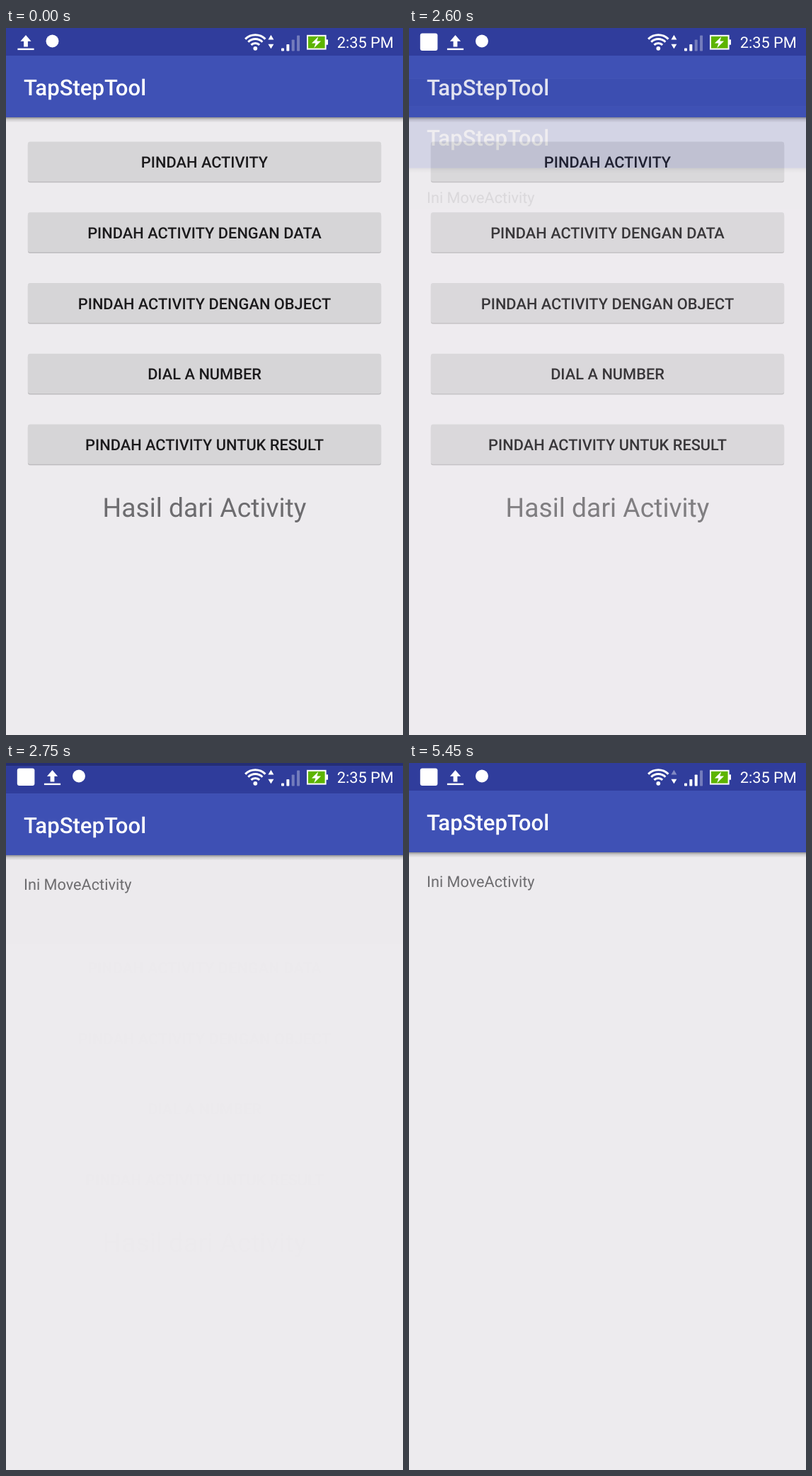
Recreate the animation shown at these times as an HTML page. Size 561x998 px, loop 5500 ms.

```html
<!DOCTYPE html>
<html lang="id">
<head>
<meta charset="utf-8">
<title>Pindah Activity</title>
<style>
  html, body { margin: 0; width: 100%; height: 100%; overflow: hidden; background: #ecebed; }
  svg { display: block; width: 100vw; height: 100vh; }
  text { font-family: Roboto, "Noto Sans", sans-serif; font-size: 21.8px; text-rendering: geometricPrecision; }
  .title { font-size: 31.1px; font-weight: 500; fill: #fff; }
  .label { font-weight: 500; text-anchor: middle; fill: #1b1a1c; }
  .body { font-size: 21.7px; fill: #6d6c6f; }
  .result { font-size: 37.3px; text-anchor: middle; }
</style>
</head>
<body>
<svg viewBox="0 0 561 998" preserveAspectRatio="none">
  <defs>
    <linearGradient id="shade" x1="0" y1="0" x2="0" y2="1">
      <stop offset="0" stop-color="#000" stop-opacity=".4"/>
      <stop offset=".4" stop-color="#000" stop-opacity=".14"/>
      <stop offset="1" stop-color="#000" stop-opacity="0"/>
    </linearGradient>
    <clipPath id="btnClip"><rect x="30.9" y="160.5" width="499.2" height="56.3" rx="3.2"/></clipPath>
    <g id="chrome">
      <rect width="561" height="998" fill="#edebee"/>
      <rect y="126" width="561" height="7.5" fill="url(#shade)"/>
      <rect y="39" width="561" height="87" fill="#3f51b5"/>
      <rect width="561" height="39" fill="#303d9c"/>
      <text class="title" x="25" y="94.7">TapStepTool</text>
    </g>
  </defs>

  <g id="menu">
    <use href="#chrome"/>
    <g id="buttons"></g>
    <text class="body result" x="280.5" y="690.3">Hasil dari Activity</text>
  </g>
  <rect id="dim" width="561" height="998"/>

  <g id="page">
    <use href="#chrome"/>
    <text class="body" x="25" y="174.9">Ini MoveActivity</text>
  </g>

  <g fill="#fff">
    <rect id="square" x="15.8" y="7.4" width="24.6" height="24.6" rx="3"/>
    <g id="notices">
      <path d="M28 10l7.6 8.8h-4.7v7.6h-5.8v-7.6h-4.7z"/>
      <rect x="16.4" y="28.7" width="23.2" height="2.4"/>
      <circle cx="65.5" cy="18.5" r="9"/>
    </g>
    <g id="wifi" fill="none" stroke="#fff" stroke-width="3"></g>
    <circle cx="352.3" cy="28.8" r="2.9"/>
    <path id="up" d="M374.4 9.8l4 6.6h-8z"/>
    <path d="M374.4 29.3l4-6.6h-8z"/>
    <g id="bars"></g>
    <rect x="426" y="10.8" width="25.6" height="18.8" fill="#5db400" stroke="#fff" stroke-width="2"/>
    <rect x="452" y="16.3" width="3" height="7.4"/>
    <path d="M441.3 12.3l-9.4 9.3h5.6l-2.3 6.6 9.9-9.6h-5.7z"/>
    <text x="467.7" y="28.2">2:35 PM</text>
  </g>
</svg>
<script>
const LOOP = 5500, STEP = 50;
const PRESS = 2150, OPEN = 2592.5;
const NS = 'http://www.w3.org/2000/svg';
const $ = id => document.getElementById(id);
const clamp = v => Math.max(0, Math.min(1, v));
const smooth = v => v * v * (3 - 2 * v);

function add(parent, tag, attrs, text) {
  const el = document.createElementNS(NS, tag);
  for (const k in attrs) el.setAttribute(k, attrs[k]);
  if (text) el.textContent = text;
  parent.appendChild(el);
  return el;
}

const labels = [
  'PINDAH ACTIVITY', 'PINDAH ACTIVITY DENGAN DATA', 'PINDAH ACTIVITY DENGAN OBJECT',
  'DIAL A NUMBER', 'PINDAH ACTIVITY UNTUK RESULT'
];
const PITCH = 99.75;
let glow, ripple;
labels.forEach((label, i) => {
  const box = { x: 30.9, y: 160.5 + i * PITCH, width: 499.2, height: 56.3, rx: 3.2 };
  const g = $('buttons');
  add(g, 'rect', { ...box, y: box.y + 1.4, fill: '#000', opacity: .2 });
  add(g, 'rect', { ...box, fill: '#d6d5d7' });
  if (!i) {
    glow = add(g, 'rect', box);
    ripple = add(g, 'circle', { cx: 280.5, cy: 189, 'clip-path': 'url(#btnClip)' });
  }
  add(g, 'text', { class: 'label', x: 280.5, y: 197 + i * PITCH }, label);
});

for (const r of [20, 14.2, 8.3]) {
  const d = r * Math.SQRT1_2;
  add($('wifi'), 'path', { d: `M${352.3 - d} ${29.8 - d}A${r} ${r} 0 0 1 ${352.3 + d} ${29.8 - d}` });
}

const bars = [28.4, 23, 16.5, 10.5].map((y, i) =>
  add($('bars'), 'rect', { x: 389 + i * 7.35, y, width: 4, height: 32.5 - y, rx: .8 }));

function draw(t) {
  const started = t >= STEP;
  $('square').setAttribute('opacity', started ? 1 : 0);
  $('notices').setAttribute('transform', `translate(${started ? 37.5 : 0} 0)`);

  // touch feedback on the first button
  const p = t - PRESS;
  const ink = .06 * clamp(p / 100) * clamp((450 - p) / 300);
  glow.setAttribute('opacity', ink);
  ripple.setAttribute('opacity', ink);
  ripple.setAttribute('r', 255 * (1 - (1 - clamp(p / 350)) ** 2));

  // the new page rises and fades in while the menu darkens
  const o = t - OPEN;
  const rise = 80 * (1 - clamp(o / 350)) ** 5;
  $('page').setAttribute('transform', `translate(0 ${rise})`);
  $('page').setAttribute('opacity', 1 - (1 - clamp(o / 200)) ** 4);
  $('dim').setAttribute('opacity', .3 * smooth(clamp(o / 217)));

  const lit = t >= 3250 ? 3 : 2;
  bars.forEach((bar, i) => bar.setAttribute('opacity', i < lit ? 1 : .33));
  $('up').setAttribute('opacity', t >= 5050 ? .4 : 1);
}

const t0 = performance.now();
function tick() {
  const t = (performance.now() - t0) % LOOP;
  draw(Math.floor(t / STEP) * STEP);
  requestAnimationFrame(tick);
}
tick();
</script>
</body>
</html>
```
